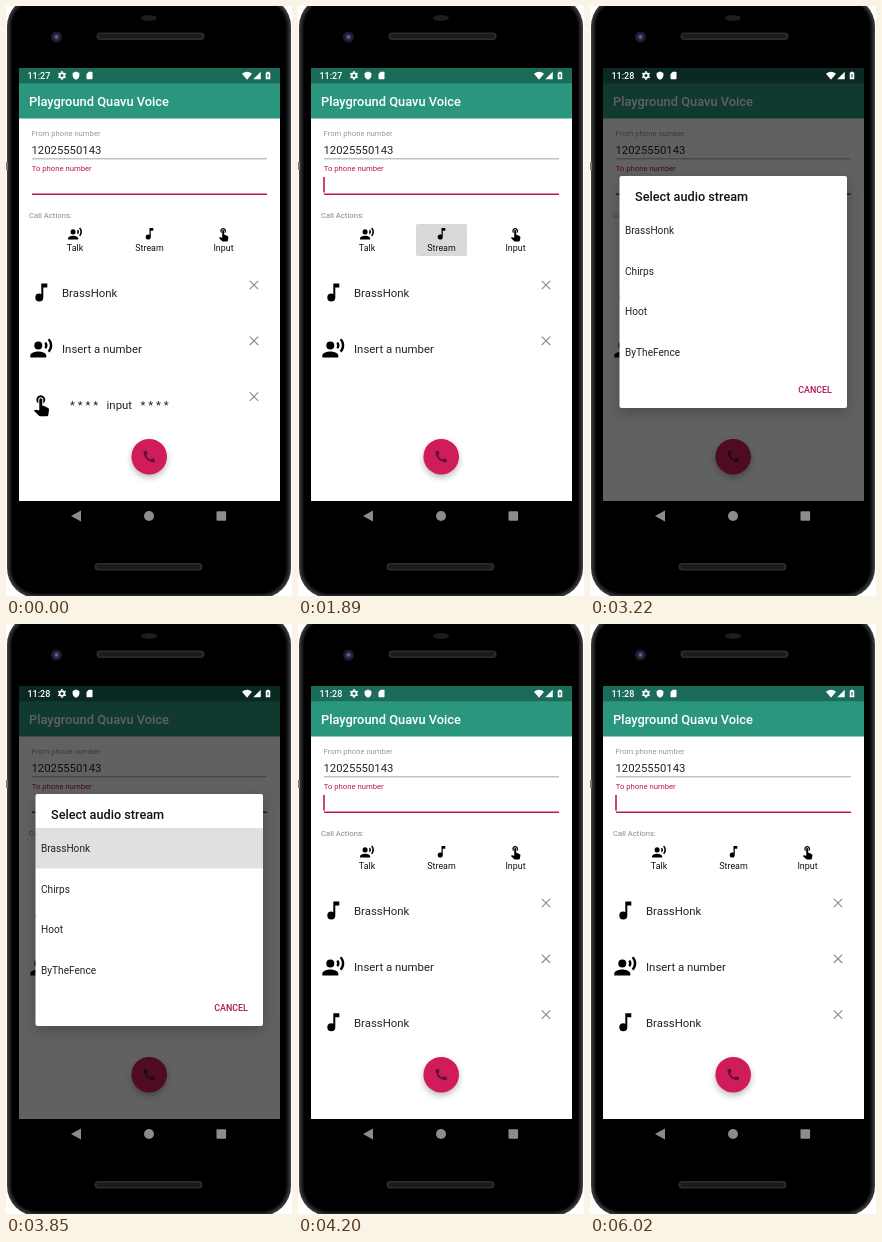
Recreate the animation shown at these times as an HTML page with a canvas. Size 286x590 px, loop 6300 ms.

```html
<!DOCTYPE html>
<html lang="en">
<head>
<meta charset="utf-8">
<title>Voice playground</title>
<style>
html, body { margin: 0; width: 100%; height: 100%; overflow: hidden; background: #fff; }
canvas { display: block; width: 286px; height: 590px; }
</style>
</head>
<body>
<canvas id="stage"></canvas>
<script>
const W = 286, H = 590, LOOP = 6300, STEP = 70;
const canvas = document.getElementById('stage');
const ctx = canvas.getContext('2d');
const dpr = window.devicePixelRatio || 1;
canvas.width = W * dpr;
canvas.height = H * dpr;

const ACCENT = '#bd1659', INK = '#222';
const ICONS = {
  note: new Path2D('M12 3v10.55c-.59-.34-1.27-.55-2-.55a4 4 0 1 0 4 4V7h4V3z'),
  talk: new Path2D('M5 9a4 4 0 1 0 8 0a4 4 0 1 0-8 0M9 15c-2.67 0-8 1.34-8 4v2h16v-2c0-2.66-5.33-4-8-4z' +
    'M16.76 5.36l-1.68 1.69c.84 1.18.84 2.71 0 3.89l1.68 1.69c2.02-2.02 2.02-5.07 0-7.27z' +
    'M20.07 2l-1.63 1.63c2.77 3.02 2.77 7.56 0 10.74L20.07 16c3.9-3.89 3.91-9.95 0-14z'),
  touch: new Path2D('M9 11.24V7.5a2.5 2.5 0 0 1 5 0v3.74a4.5 4.5 0 1 0-5 0z' +
    'M18.84 15.87l-4.54-2.26l-.54-.11H13v-6a1.5 1.5 0 0 0-3 0v10.74l-3.43-.72q-.6-.1-1.03.3' +
    'l-.79.8 4.94 4.94q.4.44 1.06.44h6.79q1.2 0 1.44-1.28l.75-5.27q.1-1.1-.89-1.58z'),
  call: new Path2D('M20 15.38q-1.8 0-3.53-.56-.6-.1-1 .24l-1.57 1.97q-4.6-2.3-6.89-6.83' +
    'l1.95-1.66q.4-.5.24-1.02-.56-1.7-.56-3.53-.1-1-1-1H4.19Q3 3 3 4a17 17 0 0 0 17 17q1 0 1-1.18v-3.45q0-1-1-1z'),
  wifi: new Path2D('M0 8Q12-2 24 8L12 22z'),
  signal: new Path2D('M2 22H22V2z'),
  shield: new Path2D('M12 1L3 5v6q0 8.5 9 12q9-3.5 9-12V5z'),
  card: new Path2D('M10 2h8q2 0 2 2v16q0 2-2 2H6q-2 0-2-2V8z'),
  battery: new Path2D('M9 2h6v2h3v18H6V4h3z')
};

const clamp = v => Math.max(0, Math.min(1, v));
const ramp = (t, from, to) => clamp((t - from) / (to - from));
const between = (t, a, b) => t >= a && t < b;

function rect(x, y, w, h, color, r = 0) {
  ctx.fillStyle = color;
  ctx.beginPath();
  ctx.roundRect(x, y, w, h, r);
  ctx.fill();
}

function disc(x, y, r, color) {
  ctx.fillStyle = color;
  ctx.beginPath();
  ctx.arc(x, y, r, 0, Math.PI * 2);
  ctx.fill();
}

function text(str, x, y, size, color = INK, weight = 400, align = 'left') {
  ctx.font = `${weight} ${size}px Roboto, sans-serif`;
  ctx.textAlign = align;
  ctx.fillStyle = color;
  ctx.fillText(str, x, y);
}

function icon(name, cx, cy, size, color = '#000') {
  ctx.save();
  ctx.translate(cx - size / 2, cy - size / 2);
  ctx.scale(size / 24, size / 24);
  ctx.fillStyle = color;
  ctx.fill(ICONS[name]);
  ctx.restore();
}

function faded(alpha, draw) {
  if (alpha <= 0) return;
  ctx.save();
  ctx.globalAlpha *= alpha;
  draw();
  ctx.restore();
}

function shadowed(blur, dy, alpha, draw) {
  ctx.save();
  ctx.shadowColor = `rgba(0,0,0,${alpha})`;
  ctx.shadowBlur = blur * dpr;
  ctx.shadowOffsetY = dy * dpr;
  draw();
  ctx.restore();
}

function speaker(x, y) {
  rect(x, y, 108, 7.5, '#2c2c2c', 3.7);
  rect(x + 2, y + 1.5, 104, 4.5, '#1b1b1b', 2.2);
}

function phone() {
  rect(0, 0, W, H, '#fff');
  // the rim darkens towards the glass
  for (let i = 0; i <= 5; i++) {
    const g = 60 - 12 * i;
    rect(1 + i, -9.6 + i, 284 - 2 * i, 601.6 - 2 * i, `rgb(${g},${g},${g})`, 30 - i);
  }
  rect(0, 156, 2, 8, '#777');
  ctx.fillStyle = '#1d1d1d';
  ctx.beginPath();
  ctx.ellipse(143, 12, 8, 3, 0, 0, Math.PI * 2);
  ctx.fill();
  disc(50.5, 31, 5.5, '#1c1c2c');
  disc(50.5, 31, 3, '#34345e');
  disc(50.5, 31, 1.4, '#6a6a9c');
  speaker(90.5, 26.5);
  speaker(88.5, 557);

  ctx.fillStyle = '#8c8c8c';
  ctx.beginPath();
  ctx.moveTo(65, 510);
  ctx.lineTo(75, 504.5);
  ctx.lineTo(75, 515.5);
  ctx.fill();
  disc(143, 510, 5, '#8c8c8c');
  rect(210.5, 505.2, 9.6, 9.6, '#8c8c8c', 1);
}

function statusBar(t) {
  text(t < 3010 ? '11:27' : '11:28', 21.5, 73, 9, '#fff', 500);
  ctx.strokeStyle = '#fff';
  ctx.lineWidth = 1.8;
  ctx.beginPath();
  ctx.arc(56, 69.5, 2.4, 0, Math.PI * 2);
  ctx.stroke();
  ctx.lineWidth = 1.4;
  ctx.beginPath();
  for (let i = 0; i < 6; i++) {
    const a = i * Math.PI / 3 + Math.PI / 6, c = Math.cos(a), s = Math.sin(a);
    ctx.moveTo(56 + 3 * c, 69.5 + 3 * s);
    ctx.lineTo(56 + 4.4 * c, 69.5 + 4.4 * s);
  }
  ctx.stroke();
  icon('shield', 70, 69.5, 9, '#fff');
  icon('card', 83.5, 69.5, 9, '#fff');
  icon('wifi', 241, 69.5, 10, '#fff');
  icon('signal', 251, 69.5, 9, '#fff');
  icon('battery', 262, 69.5, 9, '#fff');
  rect(261.4, 68, 1.2, 3.4, '#1b6b59');
}

function cursorOn(t) {
  return between(t, 490, 980) || between(t, 1540, 1960) ||
    between(t, 3920, 4410) || between(t, 4970, 5460) || t >= 6020;
}

function form(t) {
  text('From phone number', 25.5, 130, 7.7, '#999');
  text('12025550143', 25.5, 148, 11.3);
  rect(26, 152.4, 235, 0.9, '#888');
  text('To phone number', 25.8, 165, 7.7, ACCENT);
  rect(26, 187.6, 235, 1.4, ACCENT);
  if (cursorOn(t)) rect(25.2, 171, 1.6, 15.5, ACCENT);

  text('Call Actions:', 23, 212, 7.7, '#888');
  const press = between(t, 1540, 2170) ? ramp(t, 1470, 1750) : 0;
  faded(press, () => rect(118, 218, 51, 32, '#d9d9d9', 2));
  [['talk', 'Talk', 69], ['note', 'Stream', 143.5], ['touch', 'Input', 217.5]].forEach(([name, label, x]) => {
    icon(name, x, 227.8, 15.2);
    text(label, x, 245, 8.9, '#111', 400, 'center');
  });
}

function row(index, name, label, x = 56) {
  const y = 287 + index * 55.8;
  icon(name, 35.3, y - 0.4, 24);
  text(label, x, y + 4.2, 11.4);
  ctx.strokeStyle = '#8a8a8a';
  ctx.lineWidth = 1.1;
  ctx.beginPath();
  for (const d of [-4.2, 4.2]) {
    ctx.moveTo(248 - d, y - 12.2);
    ctx.lineTo(248 + d, y - 3.8);
  }
  ctx.stroke();
}

function list(t) {
  row(0, 'note', 'BrassHonk');
  row(1, 'talk', 'Insert a number');

  // the third row is dismissed, then a stream takes its place
  const touch = ramp(t, 0, 280);
  faded(1 - ramp(t, 280, 420), () => {
    if (touch) disc(248, 390.6, 12 * touch, 'rgba(0,0,0,.1)');
    row(2, 'touch', '* * * *   input   * * * *', 64);
  });
  const added = ramp(t, 3900, 4045);
  faded(added, () => row(2, 'note', 'BrassHonk'));
  if (added > 0 && added < 1) rect(23, 374, 241, 1, 'rgba(0,0,0,.13)');
}

function fab(t) {
  const press = ramp(t, 5180, 5460) * (1 - ramp(t, 5600, 5880));
  shadowed(6 + 3 * press, 3 + 2 * press, 0.28, () => disc(143.2, 450.7, 17.8, '#d01c5a'));
  if (press) disc(143.2, 450.7, 17.8, `rgba(255,255,255,${0.12 * press})`);
  icon('call', 143.2, 450.7, 15, '#5c1230');
}

function dialog(t) {
  const shown = 1 - (1 - ramp(t, 1900, 2095)) ** 4;
  faded(shown * (1 - ramp(t, 3850, 3960)), () => {
    shadowed(14, 5, 0.22, () => rect(29.5, 170, 227.5, 232, '#fff', 2));
    const touch = ramp(t, 3640, 3850);
    if (touch) rect(29.5, 204, 227.5, 40.5, `rgba(0,0,0,${0.12 * touch})`);
    text('Select audio stream', 45, 195, 12.7, '#111', 500);
    ['BrassHonk', 'Chirps', 'Hoot', 'ByTheFence'].forEach((label, i) =>
      text(label, 35, 228 + i * 40.5, 10.1));
    text('CANCEL', 208.2, 387, 8.9, '#ad1457', 500);
  });
}

function draw(t) {
  ctx.setTransform(dpr, 0, 0, dpr, 0, 0);
  phone();
  rect(13, 112, 261, 383, '#fff');
  form(t);
  list(t);
  fab(t);
  rect(13, 77, 261, 35.5, '#2a967e');
  rect(13, 62, 261, 15.2, '#1b6b59');
  text('Playground Quavu Voice', 23, 99.5, 12.85, '#fff', 500);

  const dim = 0.62 * ramp(t, 1900, 2095) * (1 - ramp(t, 3850, 4025));
  if (dim) rect(13, 62, 261, 433, `rgba(0,0,0,${dim})`);
  statusBar(t);
  dialog(t);
}

const start = performance.now();
function tick() {
  const t = (performance.now() - start) % LOOP;
  draw(Math.floor(t / STEP) * STEP);
  requestAnimationFrame(tick);
}
tick();
</script>
</body>
</html>
```
